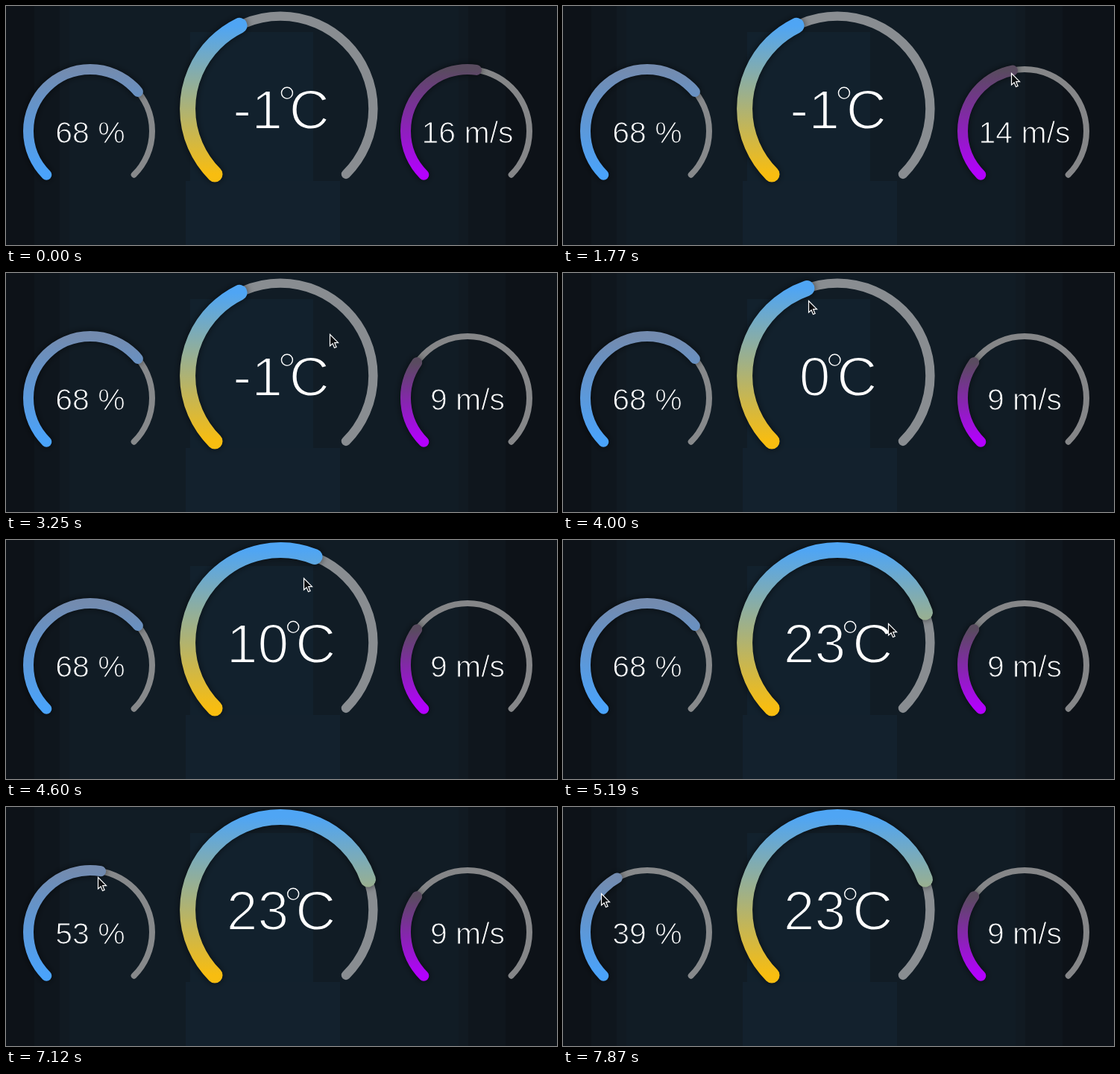
These frames come from a looping animation (739x321 px, 8000 ms). An HTML page with a canvas:

```html
<!DOCTYPE html>
<html lang="en">
<head>
<meta charset="utf-8">
<title>Weather gauges</title>
<style>
  html, body { margin: 0; width: 100%; height: 100%; overflow: hidden; background: #0e131a; }
  canvas { display: block; }
</style>
</head>
<body>
<canvas id="stage" width="739" height="321"></canvas>
<script>
const ctx = document.getElementById('stage').getContext('2d');
const layer = document.createElement('canvas');
layer.width = 739;
layer.height = 321;
const ink = layer.getContext('2d');

// The scene advances in discrete steps; start and end below are steps.
const LOOP = 8000, STEPS = 54;
const START = 135, SWEEP = 270;
const ENTER = { step: 5, x: 711, y: 140 };
const EXIT = { step: 53, x: 51, y: 116 };
const PAUSE = 2;

const rad = deg => deg * Math.PI / 180;
const mix = (a, b, k) => a + (b - a) * k;
const progress = (step, start, end) => Math.min(1, Math.max(0, (step - start) / (end - start)));
const smooth = k => k * k * (3 - 2 * k);

// In the order they are dragged; reach is the pointer's distance from the centre.
const gauges = [
  {
    x: 619, y: 168, r: 83, track: 8, fill: 14, grey: '#858688',
    top: '#594b5f', bottom: '#b400ff',
    start: 9, end: 17, from: 278.3, to: 215.2, reach: [80, 80],
    label: part => Math.round(part * 30) + ' m/s'
  },
  {
    x: 368, y: 138, r: 124.4, track: 12.4, fill: 21, grey: '#898d91',
    top: '#4fa5f4', bottom: '#f8bd10',
    start: 26, end: 35, from: 243.8, to: 340.8, reach: [111, 73],
    degrees: part => Math.trunc(part * 70 - 30)
  },
  {
    x: 113, y: 168, r: 83, track: 8, fill: 14, grey: '#87898b',
    top: '#738baf', bottom: '#4aa3fb',
    start: 44, end: 51, from: 320.4, to: 240.9, reach: [76, 73],
    label: part => Math.floor(part * 100) + ' %'
  }
];

const dragged = (g, step) => progress(step, g.start, g.end) ** 1.2;
const angleAt = (g, step) => mix(g.from, g.to, dragged(g, step));

function grip(g, step) {
  const reach = mix(...g.reach, dragged(g, step));
  const angle = rad(angleAt(g, step) - 2);
  return { x: g.x + reach * Math.cos(angle), y: g.y + reach * Math.sin(angle) };
}

const between = (a, b, k) => ({ x: mix(a.x, b.x, k), y: mix(a.y, b.y, k) });

function cursorAt(step) {
  let here = ENTER, leave = ENTER.step;
  for (const g of gauges) {
    if (step < g.start) {
      return between(here, grip(g, g.start), smooth(progress(step, leave, g.start - 1)));
    }
    if (step <= g.end) return grip(g, step);
    here = grip(g, g.end);
    leave = g.end + PAUSE;
  }
  return between(here, EXIT, progress(step, leave - PAUSE, EXIT.step));
}

function block(color, x, y, w, h) {
  ctx.fillStyle = color;
  ctx.fillRect(x, y, w, h);
}

function drawBackground() {
  block('#0d1218', 0, 0, 739, 321);
  block('#0f161d', 38, 0, 632, 321);
  block('#111a22', 72, 0, 548, 321);
  block('#111c25', 85, 0, 522, 321);
  block('#12212d', 247, 35, 165, 200);
  block('#13212d', 241, 235, 207, 86);
}

function strokeArc(g, end, width, color) {
  ctx.beginPath();
  ctx.arc(g.x, g.y, g.r, rad(START), rad(end));
  ctx.lineWidth = width;
  ctx.lineCap = 'round';
  ctx.strokeStyle = color;
  ctx.stroke();
}

function setFont(size) {
  ink.font = `${size}px "Liberation Sans", Arial, sans-serif`;
}

// Light lettering: a regular weight with its outline trimmed away.
function write(text, x, y, size, align) {
  setFont(size);
  ink.textAlign = align;
  ink.fillStyle = '#fff';
  ink.fillText(text, x, y);
  ink.globalCompositeOperation = 'destination-out';
  ink.lineJoin = 'round';
  ink.lineWidth = size > 50 ? 2.1 : 1.1;
  ink.strokeText(text, x, y);
  ink.globalCompositeOperation = 'source-over';
}

function drawTemperature(value, centre) {
  const size = 75;
  setFont(size);
  const width = ink.measureText(value).width;
  const left = centre - (width + 61) / 2;
  write(value, left, 165, size, 'left');
  write('C', left + width + 9, 165, size, 'left');
  write('°', left + width + 6, 154, 66, 'center');
}

function drawGauge(g, step) {
  const angle = angleAt(g, step);
  const part = (angle - START) / SWEEP;
  strokeArc(g, START + SWEEP, g.track, g.grey);

  // The gradient spans the filled arc, so it shrinks with it.
  const topY = g.y + g.r * (angle > 270 ? -1 : Math.sin(rad(angle)));
  const color = ctx.createLinearGradient(0, topY, 0, g.y + g.r * Math.SQRT1_2);
  color.addColorStop(0, g.top);
  color.addColorStop(1, g.bottom);
  ctx.save();
  ctx.shadowColor = 'rgba(0,0,0,.6)';
  ctx.shadowBlur = 10;
  strokeArc(g, angle, g.fill, color);
  ctx.restore();

  if (g.degrees) drawTemperature(String(g.degrees(part)), g.x);
  else write(g.label(part), g.x, 184, 41, 'center');
}

const arrow = new Path2D('M0 0V15.5L3.6 12.2L6 18L8.6 16.9L6.2 11.2H11Z');

function drawCursor(step) {
  if (step < ENTER.step) return;
  const { x, y } = cursorAt(step);
  ctx.save();
  ctx.translate(Math.round(x) + .5, Math.round(y) + .5);
  ctx.fillStyle = '#0b0d10';
  ctx.fill(arrow);
  ctx.lineWidth = 1.2;
  ctx.strokeStyle = '#fff';
  ctx.stroke(arrow);
  ctx.restore();
}

function frame() {
  const step = Math.floor((performance.now() % LOOP) / LOOP * STEPS + .12);
  ink.clearRect(0, 0, layer.width, layer.height);
  drawBackground();
  gauges.forEach(g => drawGauge(g, step));
  ctx.drawImage(layer, 0, 0);
  drawCursor(step);
  requestAnimationFrame(frame);
}
frame();
</script>
</body>
</html>
```
